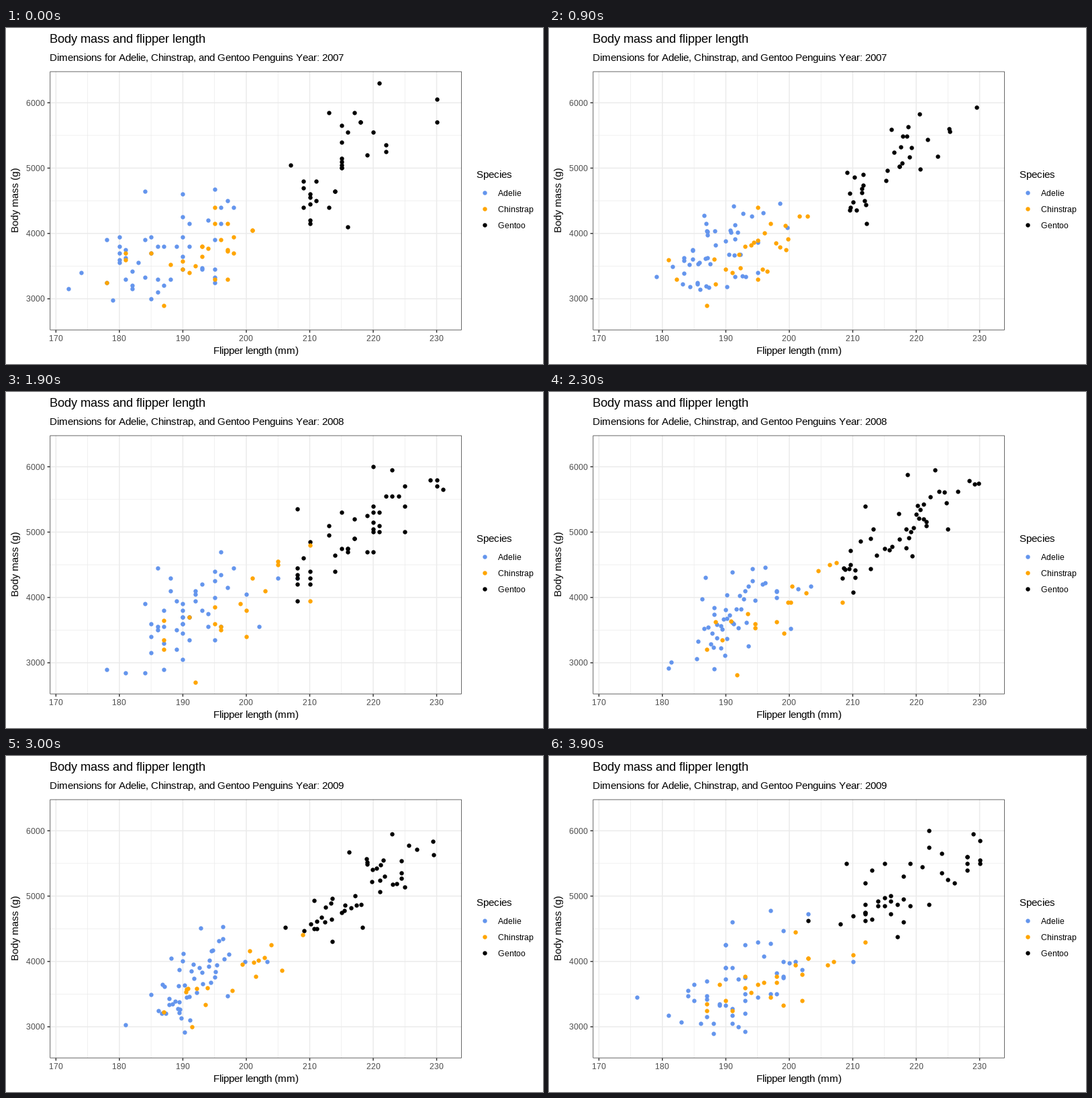
These frames come from a looping animation (800 px wide and 500 px high, 10000 ms). A matplotlib script:

```python
import numpy as np
import matplotlib.pyplot as plt
from matplotlib.animation import FuncAnimation
from matplotlib.patches import Rectangle
from matplotlib.textpath import TextPath

plt.rcParams["font.family"] = "Liberation Sans"

WIDTH, HEIGHT, DPI = 800, 500, 100
LEFT, RIGHT, TOP, BOTTOM = 65.4, 678.9, 64.6, 449.6
X_RANGE, Y_RANGE = (169.05, 233.95), (2520, 6480)
KEYS = (0, 19, 39)            # frames on which the three years are reached
FRAMES, INTERVAL = 100, 100
COLORS = {"Adelie": "#6495ED", "Chinstrap": "#FFA500", "Gentoo": "#000000"}
GRID, DARK, TICK_TEXT = "#EBEBEB", "#333333", "#4D4D4D"
NA = np.nan

penguins = {}


def record(species, flippers, masses):
    """Append one year of measurements (mm, g) for a species."""
    rows = np.column_stack([flippers, masses]).astype(float)
    penguins.setdefault(species, []).append(rows)


# 2007, 2008, 2009 for each species
record("Adelie",
       [181, 186, 195, NA, 193, 190, 181, 195, 193, 190, 186, 180, 182, 191, 198, 185, 195,
        197, 184, 194, 174, 180, 189, 185, 180, 187, 183, 187, 172, 180, 178, 178, 188, 184,
        195, 196, 190, 180, 181, 184, 182, 195, 186, 196, 185, 190, 182, 179, 190, 191],
       [3750, 3800, 3250, NA, 3450, 3650, 3625, 4675, 3475, 4250, 3300, 3700, 3200, 3800,
        4400, 3700, 3450, 4500, 3325, 4200, 3400, 3600, 3800, 3950, 3800, 3800, 3550, 3200,
        3150, 3950, 3250, 3900, 3300, 3900, 3325, 4150, 3950, 3550, 3300, 4650, 3150, 3900,
        3100, 4400, 3000, 4600, 3425, 2975, 3450, 4150])
record("Adelie",
       [186, 188, 190, 200, 187, 191, 186, 193, 181, 194, 185, 195, 185, 192, 184, 192, 195,
        188, 190, 198, 190, 190, 196, 197, 190, 195, 191, 184, 187, 195, 189, 196, 187, 193,
        191, 194, 190, 189, 189, 190, 202, 205, 185, 186, 187, 208, 190, 196, 178, 192],
       [3500, 4300, 3450, 4050, 2900, 3700, 3550, 3800, 2850, 3750, 3150, 4400, 3600, 4050,
        2850, 3950, 3350, 4100, 3050, 4450, 3600, 3900, 3550, 4150, 3700, 4250, 3700, 3900,
        3550, 4000, 3200, 4700, 3800, 4200, 3350, 3550, 3800, 3500, 3950, 3600, 3550, 4300,
        3400, 4450, 3300, 4300, 3700, 4350, 2900, 4100])
record("Adelie",
       [192, 203, 183, 190, 193, 184, 199, 190, 181, 197, 198, 191, 193, 197, 191, 196, 188,
        199, 189, 189, 187, 198, 176, 202, 186, 199, 191, 195, 191, 210, 190, 197, 193, 199,
        187, 190, 191, 200, 185, 193, 193, 187, 188, 190, 192, 185, 190, 184, 195, 193, 187,
        201],
       [3725, 4725, 3075, 4250, 2925, 3550, 3750, 3900, 3175, 4775, 3825, 4600, 3200, 4275,
        3900, 4075, 2900, 3775, 3350, 3325, 3150, 3500, 3450, 3875, 3050, 4000, 3275, 4300,
        3050, 4000, 3325, 3500, 3500, 4475, 3425, 3900, 3175, 3975, 3400, 4250, 3400, 3475,
        3050, 3725, 3000, 3650, 4250, 3475, 3450, 3750, 3700, 4000])

record("Gentoo",
       [211, 230, 210, 218, 215, 210, 211, 219, 209, 215, 214, 216, 214, 213, 210, 217, 210,
        221, 209, 222, 218, 215, 213, 215, 215, 215, 216, 215, 210, 220, 222, 209, 207, 230],
       [4500, 5700, 4450, 5700, 5400, 4550, 4800, 5200, 4400, 5150, 4650, 5550, 4650, 5850,
        4200, 5850, 4150, 6300, 4800, 5350, 5700, 5000, 4400, 5050, 5000, 5100, 4100, 5650,
        4600, 5550, 5250, 4700, 5050, 6050])
record("Gentoo",
       [220, 220, 213, 219, 208, 208, 208, 225, 210, 216, 222, 217, 210, 225, 213, 215, 210,
        220, 210, 225, 217, 220, 208, 220, 208, 224, 208, 221, 214, 231, 219, 230, 214, 229,
        220, 223, 216, 221, 221, 217, 216, 230, 209, 220, 215, 223],
       [5150, 5400, 4950, 5250, 4350, 5350, 3950, 5700, 4300, 4750, 5550, 4900, 4200, 5400,
        5100, 5300, 4850, 5300, 4400, 5000, 4900, 5050, 4300, 5000, 4450, 5550, 4200, 5300,
        4400, 5650, 4700, 5700, 4650, 5800, 4700, 5550, 4750, 5000, 5100, 5200, 4700, 5800,
        4600, 6000, 4750, 5950])
record("Gentoo",
       [212, 221, 212, 224, 212, 228, 218, 218, 212, 230, 218, 228, 212, 224, 214, 226, 216,
        222, 203, 225, 219, 228, 215, 228, 216, 215, 210, 219, 208, 209, 216, 229, 213, 230,
        217, 230, 217, 222, 214, NA, 215, 222, 212, 213],
       [4625, 5450, 4725, 5350, 4750, 5600, 4600, 5300, 4875, 5550, 4950, 5400, 4750, 5650,
        4850, 5200, 4925, 4875, 4625, 5250, 4850, 5600, 4975, 5500, 4725, 5500, 4700, 5500,
        4575, 5500, 5000, 5950, 4650, 5500, 4375, 5850, 4875, 6000, 4925, NA, 4850, 5750,
        5200, 5400])

record("Chinstrap",
       [192, 196, 193, 188, 197, 198, 178, 197, 195, 198, 193, 194, 185, 201, 190, 201, 197,
        181, 190, 195, 181, 191, 187, 193, 195, 197],
       [3500, 3900, 3650, 3525, 3725, 3950, 3250, 3750, 4150, 3700, 3800, 3775, 3700, 4050,
        3575, 4050, 3300, 3700, 3450, 4400, 3600, 3400, 2900, 3800, 3300, 4150])
record("Chinstrap",
       [200, 200, 191, 205, 187, 201, 187, 203, 195, 199, 195, 210, 192, 205, 210, 187, 196,
        196],
       [3400, 3800, 3700, 4550, 3200, 4300, 3350, 4100, 3600, 3900, 3850, 4800, 2700, 4500,
        3950, 3650, 3550, 3500])
record("Chinstrap",
       [196, 201, 190, 212, 187, 198, 199, 201, 193, 203, 187, 197, 191, 203, 202, 194, 206,
        189, 195, 207, 202, 193, 210, 198],
       [3675, 4450, 3400, 4300, 3250, 3675, 3325, 3950, 3600, 4050, 3350, 3450, 3250, 4050,
        3800, 3525, 3950, 3650, 3650, 4000, 3400, 3775, 4100, 3775])


def to_x(flipper):
    return LEFT + (flipper - X_RANGE[0]) * (RIGHT - LEFT) / (X_RANGE[1] - X_RANGE[0])


def to_y(mass):
    return BOTTOM - (mass - Y_RANGE[0]) * (BOTTOM - TOP) / (Y_RANGE[1] - Y_RANGE[0])


def measure(species, frame):
    """Matched birds glide, leavers wait for the next year, newcomers pop in on it."""
    years = penguins[species]
    if frame >= KEYS[2]:
        rows = years[2]
    else:
        i = int(frame >= KEYS[1])
        start, end = years[i], years[i + 1]
        p = (frame - KEYS[i]) / (KEYS[i + 1] - KEYS[i])
        n = min(len(start), len(end))
        rows = start.copy()
        if p > 0:
            rows[:n] += (end[:n] - start[:n]) * p
    rows = rows[~np.isnan(rows[:, 0])]
    return np.column_stack([to_x(rows[:, 0]), to_y(rows[:, 1])])


fig = plt.figure(figsize=(WIDTH / DPI, HEIGHT / DPI), dpi=DPI, facecolor="white")
ax = fig.add_axes([0, 0, 1, 1])
ax.set(xlim=(0, WIDTH), ylim=(HEIGHT, 0))
ax.axis("off")


def line(xs, ys, color, px):
    ax.plot(xs, ys, color=color, lw=px * 72 / DPI, solid_capstyle="butt", snap=False, zorder=1)


def right_edge(text):
    return TextPath((0, 0), text, size=100).get_extents().x1


unit_advance = {}


def advance(char, points):
    """Glyph advance rounded to whole pixels."""
    if char not in unit_advance:
        unit_advance[char] = (right_edge(char + "|") - right_edge("|")) / 100
    return round(unit_advance[char] * points * DPI / 72)


def label(x, y, text, points, color="black", align=0):
    """Set text on a whole-pixel grid; align is the share of width left of x."""
    steps = [advance(c, points) for c in text]
    pen = round(x - align * sum(steps))
    glyphs = []
    for char, step in zip(text, steps):
        if char != " ":
            glyphs.append(ax.text(pen - 0.49, y, char, size=points, color=color,
                                  ha="left", va="baseline", zorder=5))
        pen += step
    return glyphs


# Grid: minor lines first, then major
for offset, px in ((0.5, 0.74), (0, 1.48)):
    for k in range(17, 24 - (offset > 0)):
        x = to_x(10 * (k + offset))
        line([x, x], [TOP, BOTTOM], GRID, px)
    for k in range(3, 7 - (offset > 0)):
        y = to_y(1000 * (k + offset))
        line([LEFT, RIGHT], [y, y], GRID, px)

# Axes
for flipper in range(170, 231, 10):
    x = to_x(flipper)
    line([x, x], [BOTTOM, BOTTOM + 3.8], DARK, 1.48)
    label(x, 466, str(flipper), 8.8, TICK_TEXT, 0.5)
for mass in range(3000, 6001, 1000):
    y = to_y(mass)
    line([LEFT - 3.8, LEFT], [y, y], DARK, 1.48)
    label(58.4, round(y + 4.4), str(mass), 8.8, TICK_TEXT, 1)
ax.add_patch(Rectangle((LEFT + 0.37, TOP + 0.37), RIGHT - LEFT - 0.74, BOTTOM - TOP - 0.74,
                       fill=False, ec=DARK, lw=0.74 * 72 / DPI, snap=False, zorder=4))

# Titles
label(65, 22, "Body mass and flipper length", 13.2)
subtitle = label(65, 49, "Dimensions for Adelie, Chinstrap, and Gentoo Penguins Year: 2007", 11)
label((LEFT + RIGHT) / 2, 485, "Flipper length (mm)", 11, align=0.5)
ax.text(18.8, 304, "Body mass (g)", size=10.8, rotation=90, rotation_mode="anchor",
        ha="left", va="baseline")


def dots(points, species):
    return ax.scatter(points[:, 0], points[:, 1], s=(6.4 * 72 / DPI) ** 2,
                      color=COLORS[species], linewidths=0, zorder=3)


# Legend
label(701, 223, "Species", 11)
for row, species in enumerate(COLORS):
    y = 245.2 + 24 * row
    dots(np.array([[712.9, y]]), species)
    label(733, round(y + 4.5), species, 8.8)

clouds = {species: dots(measure(species, 0), species) for species in penguins}


def update(frame):
    for species, cloud in clouds.items():
        cloud.set_offsets(measure(species, frame))
    year = round(2007 + 2 * min(frame, KEYS[2]) / KEYS[2])
    subtitle[-1].set_text(str(year)[-1])
    return [*clouds.values(), subtitle[-1]]


anim = FuncAnimation(fig, update, frames=FRAMES, interval=INTERVAL, repeat=True, repeat_delay=0)
plt.show()
```
